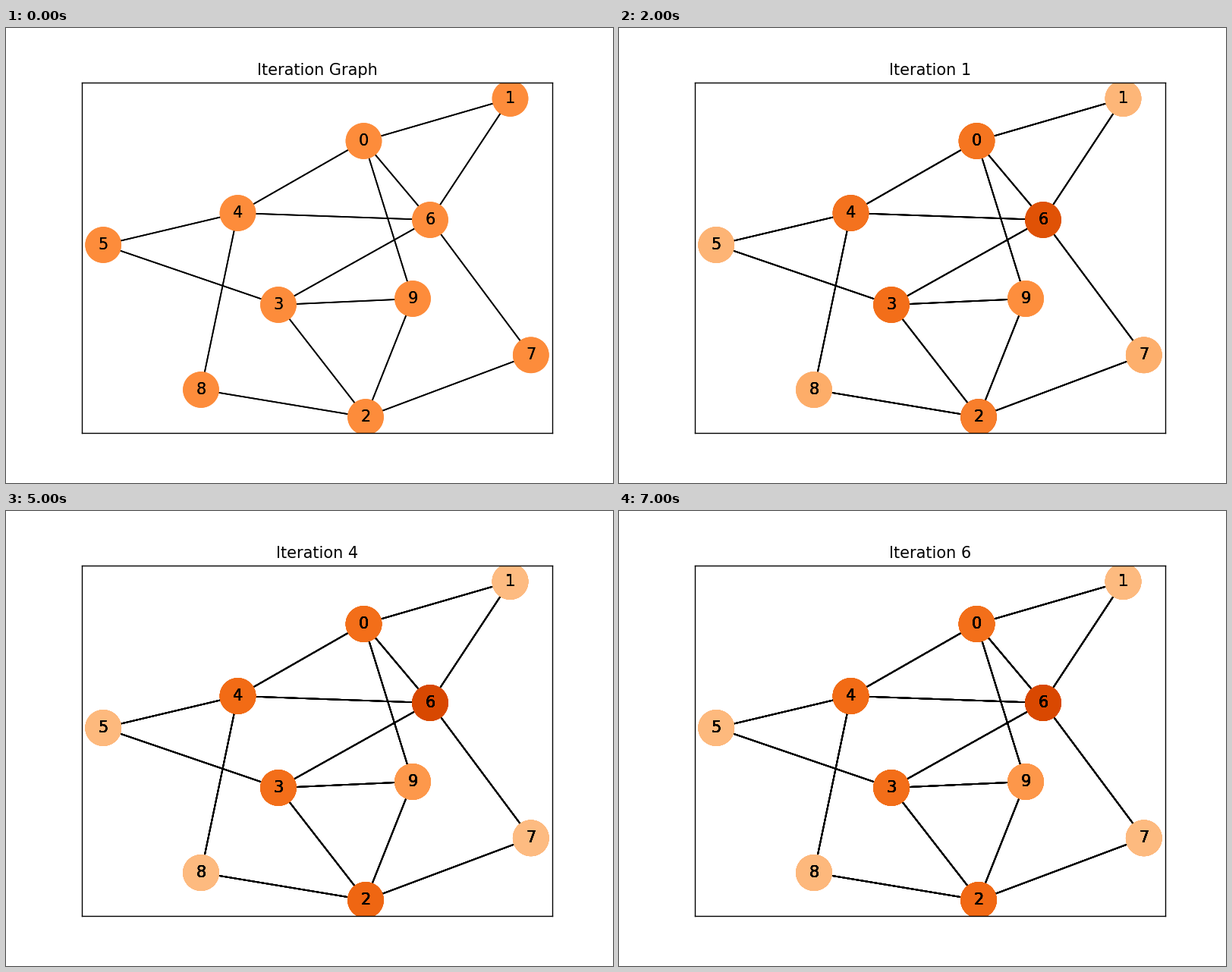
A matplotlib script for the animation above (8 s loop, 800 by 600 pixels).

```python
import numpy as np
import matplotlib.pyplot as plt
from matplotlib.animation import FuncAnimation
from matplotlib.collections import LineCollection

STEPS = 8
DAMPING = 0.85
LEFT, RIGHT, TOP, BOTTOM = 100, 720, 72, 534

# Node centres in stage pixels, y pointing down
POS = np.column_stack([
    [471.5, 664.5, 474, 359, 305.5, 128.2, 559, 691.8, 257, 536],
    [149, 93, 513, 365, 244, 286, 253, 431.3, 477, 357],
])

# Each pair of digits joins two nodes
EDGES = [tuple(map(int, pair)) for pair in
         "01 04 06 09 16 23 27 28 29 35 36 39 45 46 48 67".split()]


def rank_history():
    """Uniform start, then one PageRank step per frame."""
    n = len(POS)
    links = np.zeros((n, n))
    for a, b in EDGES:
        links[a, b] = links[b, a] = 1
    links /= links.sum(axis=0)
    ranks = [np.full(n, 1 / n)]
    for _ in range(STEPS - 1):
        ranks.append((1 - DAMPING) / n + DAMPING * links @ ranks[-1])
    return ranks


def draw_graph(rank):
    lines = LineCollection([POS[list(e)] for e in EDGES], colors="black",
                           linewidths=1, zorder=1)
    ax.add_collection(lines)
    nodes = ax.scatter(*POS.T, s=700, c=rank, cmap="Oranges", vmin=0,
                       vmax=2 / len(POS), linewidths=1, zorder=2)
    labels = [ax.text(x, y, str(i), size=12, ha="center", va="center",
                      clip_on=True, zorder=3)
              for i, (x, y) in enumerate(POS)]
    return [lines, nodes, *labels]


fig, ax = plt.subplots(figsize=(6.4, 4.8), dpi=125)
fig.subplots_adjust(left=LEFT / 800, right=RIGHT / 800,
                    bottom=1 - BOTTOM / 600, top=1 - TOP / 600)
ax.set_xticks([])
ax.set_yticks([])

# Each step paints over the earlier ones; the first is painted twice
ranks = rank_history()
layers = [draw_graph(r) for r in ranks[:1] + ranks]
ax.set_xlim(LEFT, RIGHT)
ax.set_ylim(BOTTOM, TOP)


def update(step):
    for i, layer in enumerate(layers):
        for artist in layer:
            artist.set_visible(i <= step + 1)
    ax.set_title(f"Iteration {step - 1}" if step else "Iteration Graph")
    return []


anim = FuncAnimation(fig, update, frames=STEPS, interval=1000, repeat=True,
                     init_func=lambda: update(0))
plt.show()
```
